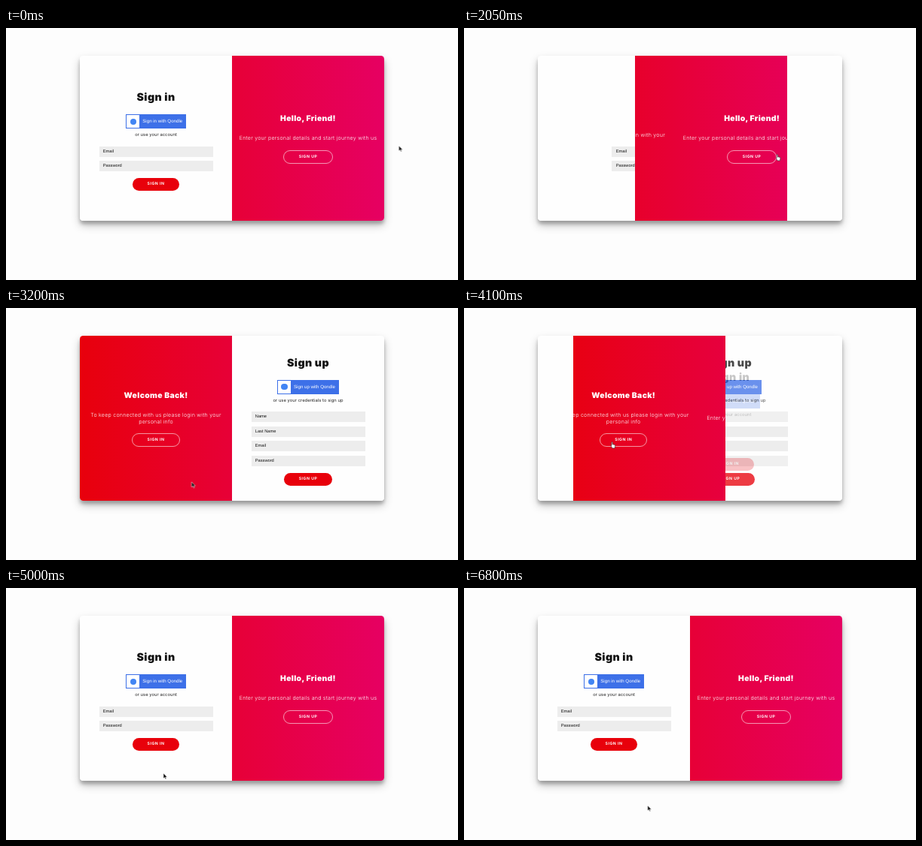
Recreate the animation shown at these times as an HTML page. Size 600 px wide and 336 px high, loop 6.85 s.

```html
<!DOCTYPE html>
<html lang="en">
<head>
<meta charset="utf-8">
<title>Sign in / Sign up slider</title>
<style>
  html, body { margin: 0; width: 100%; height: 100%; overflow: hidden; background: #fdfdfd; }
  body {
    position: relative;
    font-family: Inter, "Open Sans", sans-serif;
    text-rendering: geometricPrecision;
    --loop: 6850ms linear infinite;
  }
  body * { position: absolute; box-sizing: border-box; margin: 0; }

  .card, .shadow { left: 98px; top: 37px; width: 404px; height: 220.4px; border-radius: 4.3px; }
  .card { overflow: hidden; background: #fefefe; }
  .shadow { box-shadow: 0 6px 12px rgba(0,0,0,.25), 0 4.3px 4.3px rgba(0,0,0,.22); }

  .form, .panel { left: 0; top: 0; width: 202px; height: 100%; }
  .form { background: #fefefe; color: #111; }
  .sign-in { z-index: 2; animation: slide-form var(--loop); }
  .sign-up { z-index: 1; opacity: 0; animation: slide-form var(--loop), reveal var(--loop); }

  .window {
    left: 202px; top: 0; width: 202px; height: 100%; z-index: 100;
    overflow: hidden; animation: slide-window var(--loop);
  }
  .overlay {
    left: -202px; top: 0; width: 404px; height: 100%; color: #fff;
    background: linear-gradient(to right, #e8000c, #e60062);
    animation: slide-overlay var(--loop);
  }
  .panel.right { left: 202px; }

  /* Every text line is centred on its --y */
  h1, h2, p { top: var(--y); left: 0; width: 100%; line-height: 0; text-align: center; white-space: nowrap; }
  h1 { font-size: 14.2px; font-weight: 900; letter-spacing: .4px; }
  h2 { font-size: 10.4px; font-weight: 900; letter-spacing: .32px; }
  p { font-size: 7.1px; font-weight: 300; letter-spacing: .22px; }
  .form p { font-size: 5.8px; font-weight: 400; letter-spacing: .05px; color: #222; }

  .field {
    left: 25.5px; top: var(--y); width: 151.5px; height: 14px; padding-left: 5.3px;
    background: #ededed; color: #111; font: 5.7px/14px "Liberation Sans", Arial, sans-serif;
  }
  .btn {
    left: calc(101px - var(--w) / 2); top: var(--y); width: var(--w); height: 17px;
    border-radius: 9px; background: #e8000b; color: #fff; text-align: center;
    font-size: 5.2px; font-weight: 700; line-height: 17px; letter-spacing: .5px; white-space: nowrap;
  }
  .ghost { height: 18px; line-height: 16px; background: none; border: 1px solid rgba(255,255,255,.58); }
  .social {
    left: calc(101px - var(--w) / 2); top: var(--y); width: var(--w); height: 19px; padding-left: 22px;
    background: #3d70e8; color: #fff; white-space: nowrap;
    font: 6.15px/19px "Liberation Sans", Arial, sans-serif;
  }
  .social::before { content: ""; position: absolute; left: 1px; top: 1px; width: 17px; height: 17px; background: #fff; }
  .social::after { content: ""; position: absolute; left: 5.3px; top: 5.3px; width: 8.4px; height: 8.4px; border-radius: 50%; background: #4285f4; }

  .cursor { left: 0; top: 0; width: 10px; height: 12px; z-index: 200; overflow: visible; animation: point var(--loop); }
  .arrow { animation: arrow var(--loop); }
  .hand { animation: hand var(--loop); }

  /* Slides start at 1800ms and 3900ms: 600ms for forms and window, 700ms for the overlay inside */
  @keyframes slide-form {
    0% { left: 0; }
    26.28% { left: 0; animation-timing-function: ease-in-out; }
    35.04% { left: 202px; }
    56.93% { left: 202px; animation-timing-function: ease-in-out; }
    65.69%, 100% { left: 0; }
  }
  @keyframes slide-window {
    0% { left: 202px; }
    26.28% { left: 202px; animation-timing-function: ease-in-out; }
    35.04% { left: 0; }
    56.93% { left: 0; animation-timing-function: ease-in-out; }
    65.69%, 100% { left: 202px; }
  }
  @keyframes slide-overlay {
    0% { left: -202px; }
    26.28% { left: -202px; animation-timing-function: ease-in-out; }
    36.5% { left: 0; }
    56.93% { left: 0; animation-timing-function: ease-in-out; }
    67.15%, 100% { left: -202px; }
  }
  @keyframes reveal {
    0%, 30.65% { opacity: 0; z-index: 1; }
    30.66% { opacity: 1; z-index: 5; }
    56.93% { opacity: 1; z-index: 5; animation-timing-function: ease-in-out; }
    65.69%, 100% { opacity: 0; z-index: 1; }
  }
  @keyframes point {
    0% { transform: translate(521.5px, 157px); }
    2% { transform: translate(521.5px, 157px); animation-timing-function: ease-in-out; }
    13.9% { transform: translate(415.5px, 168.3px); }
    30% { transform: translate(414.3px, 168px); }
    33.5% { transform: translate(414.3px, 168px); animation-timing-function: ease-in; }
    40.9% { transform: translate(300px, 245px); }
    43.1% { transform: translate(272px, 259px); }
    46.72% { transform: translate(246.5px, 232px); animation-timing-function: ease-out; }
    54% { transform: translate(195px, 178px); }
    62% { transform: translate(195px, 178px); animation-timing-function: ease-in-out; }
    73% { transform: translate(209px, 247px); animation-timing-function: ease-in-out; }
    81%, 100% { transform: translate(243.7px, 290px); }
  }
  @keyframes arrow {
    0%, 11.3% { opacity: 1; }
    11.31%, 30.4% { opacity: 0; }
    30.41%, 51.5% { opacity: 1; }
    51.51%, 61.1% { opacity: 0; }
    61.11%, 100% { opacity: 1; }
  }
  @keyframes hand {
    0%, 11.3% { opacity: 0; }
    11.31%, 30.4% { opacity: 1; }
    30.41%, 51.5% { opacity: 0; }
    51.51%, 61.1% { opacity: 1; }
    61.11%, 100% { opacity: 0; }
  }
</style>
</head>
<body>
  <div class="shadow"></div>
  <main class="card">
    <section class="form sign-up">
      <h1 style="--y:36.5px">Sign up</h1>
      <div class="social" style="--y:58.7px; --w:82px">Sign up with Qondle</div>
      <p style="--y:86.7px">or use your credentials to sign up</p>
      <div class="field" style="--y:101px">Name</div>
      <div class="field" style="--y:120.5px">Last Name</div>
      <div class="field" style="--y:140px">Email</div>
      <div class="field" style="--y:159.5px">Password</div>
      <div class="btn" style="--y:182.5px; --w:64.5px">SIGN UP</div>
    </section>

    <section class="form sign-in">
      <h1 style="--y:56px">Sign in</h1>
      <div class="social" style="--y:78.4px; --w:79.5px">Sign in with Qondle</div>
      <p style="--y:106px">or use your account</p>
      <div class="field" style="--y:120.5px">Email</div>
      <div class="field" style="--y:140px">Password</div>
      <div class="btn" style="--y:162.7px; --w:62.5px">SIGN IN</div>
    </section>

    <div class="window">
      <div class="overlay">
        <section class="panel">
          <h2 style="--y:80.4px">Welcome Back!</h2>
          <p style="--y:106.2px">To keep connected with us please login with your</p>
          <p style="--y:114.8px">personal info</p>
          <div class="btn ghost" style="--y:130.4px; --w:63.5px">SIGN IN</div>
        </section>
        <section class="panel right">
          <h2 style="--y:84.4px">Hello, Friend!</h2>
          <p style="--y:110.4px">Enter your personal details and start journey with us</p>
          <div class="btn ghost" style="--y:126.4px; --w:65.5px">SIGN UP</div>
        </section>
      </div>
    </div>
  </main>

  <svg class="cursor" viewBox="0 0 10 12">
    <path class="arrow" d="M0 0V7L1.6 5.6L2.7 8.1L3.8 7.6L2.7 5.2H4.9Z" fill="#111" stroke="#fff" stroke-width=".5"/>
    <path class="hand" transform="scale(1.08)" d="M.8 .8Q1.5 .2 2 .8V3.4L4.6 4Q5.3 4.2 5.2 5L4.7 8.2H1.7L0 5.5Q-.3 4.6 .8 5Z" fill="#fff" stroke="#222" stroke-width=".55"/>
  </svg>
</body>
</html>
```
